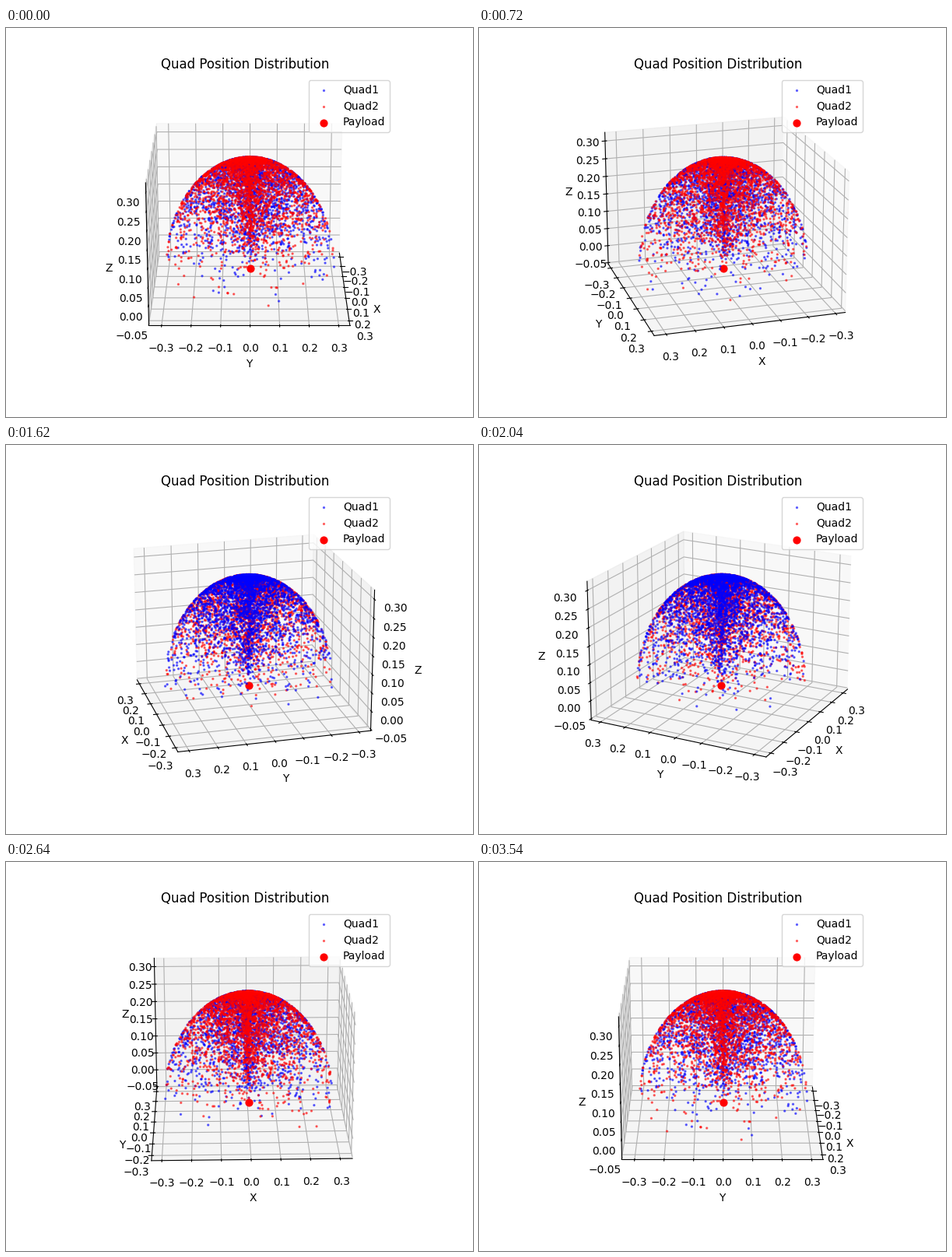
These frames come from a looping animation (600 px wide and 500 px high, 3.6 s). A matplotlib script:

```python
import numpy as np
import matplotlib.pyplot as plt
from matplotlib.animation import FuncAnimation

FRAMES = 60
INTERVAL = 60
CABLE = 0.3
COUNT = 2900

rng = np.random.default_rng(7)


def quad_positions(n):
    """Most cables are taut (on the sphere), the others slack (inside it)."""
    polar = np.radians(95.5) * (1 - rng.random(n) ** 0.42)
    turn = rng.uniform(0, 2 * np.pi, n)
    slack = np.cbrt(rng.random(n))
    r = CABLE * np.where(rng.random(n) < 0.55, 1, slack)
    flat = r * np.sin(polar)
    return flat * np.cos(turn), flat * np.sin(turn), r * np.cos(polar)


fig = plt.figure(figsize=(6, 5), dpi=100)
ax = fig.add_subplot(projection="3d", computed_zorder=False)

quad1 = ax.scatter(*quad_positions(COUNT), s=2, c="blue", alpha=0.5, label="Quad1")
quad2 = ax.scatter(*quad_positions(COUNT), s=2, c="red", alpha=0.5, label="Quad2")
ax.scatter([0], [0], [0], s=40, c="red", label="Payload", zorder=1)

ax.set_xlim(-0.335, 0.341)
ax.set_ylim(-0.343, 0.338)
ax.set_zlim(-0.054, 0.324)
ax.set_xlabel("X")
ax.set_ylabel("Y")
ax.set_zlabel("Z")
ax.set_title("Quad Position Distribution")
ax.legend(loc="upper right")

angles = np.linspace(0, 360, FRAMES)


def update(i):
    azim = angles[i]
    ax.view_init(elev=20, azim=azim)
    # The cloud nearest to the viewer is drawn last.
    blue_front = 100 < azim < 238
    quad1.set_zorder(3 if blue_front else 2)
    quad2.set_zorder(2 if blue_front else 3)
    return quad1, quad2


anim = FuncAnimation(fig, update, frames=FRAMES, interval=INTERVAL,
                     init_func=lambda: update(0), repeat=True, blit=False)
plt.show()
```
